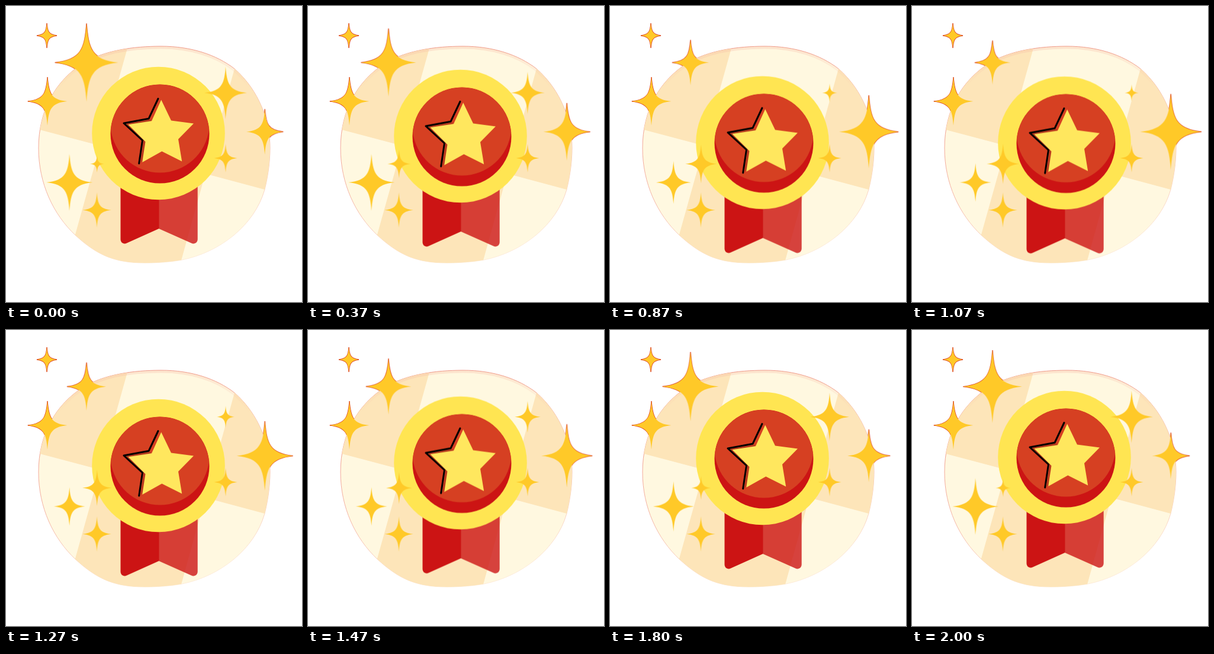
Animation, 500 px wide and 500 px high, one loop 2.03 s. Source, as an HTML page without scripts:

```html
<!DOCTYPE html>
<html lang="en">
<head>
<meta charset="utf-8">
<title>Star medal</title>
<style>
  html, body { margin: 0; width: 100%; height: 100%; overflow: hidden; background: #fff; }
  svg { display: block; width: 100vw; height: 100vh; }

  .medal, .twinkle { animation: 2030ms infinite; }
  .medal { animation-name: bob; }
  .medal, .top, .right { animation-timing-function: cubic-bezier(.364, 0, .636, 1); }
  .top { animation-name: top; }
  .right { animation-name: right; }
  .edge { animation-name: edge; animation-timing-function: linear; }
  .left { animation-name: left; animation-timing-function: cubic-bezier(.364, 0, .636, 1); }
  .ring { animation-name: ring; animation-timing-function: linear; }

  @keyframes bob { 50% { transform: translateY(16.5px); } }
  @keyframes top {
    0% { transform: scale(.66); }
    50% { transform: scale(.37); }
    100% { transform: scale(.615); }
  }
  @keyframes right {
    0%, 100% { transform: scale(.443); }
    50% { transform: scale(.14); }
  }
  @keyframes edge {
    0%, 100% { transform: scale(.385); }
    19% { transform: scale(.492); }
    50% { transform: scale(.655); }
    80% { transform: scale(.492); }
  }
  @keyframes left {
    0%, 28.1%, 100% { transform: scale(.48); }
    50%, 72.4% { transform: scale(.325); }
  }
  @keyframes ring {
    0%, 100% { transform: scale(.145); }
    19% { transform: scale(.245); }
    28% { transform: scale(.28); }
    50% { transform: scale(.35); }
    80% { transform: scale(.245); }
  }
</style>
</head>
<body>
<svg viewBox="0 0 500 500">
  <defs>
    <path id="spark" vector-effect="non-scaling-stroke"
      d="M0-100C5-36 13-7 81 0C13 7 5 36 0 100C-5 36-13 7-81 0C-13-7-5-36 0-100Z"/>
    <path id="blob" d="M262 68C312 68 355 82 386 106C428 143 446 195 446 240C446 265 442 290 437 310C420 370 362 416 297 429C275 433 250 434 235 434C185 434 155 422 117 387C80 352 55 300 55 240C55 175 85 125 130 97C165 75 215 68 262 68Z"/>
    <clipPath id="inside"><use href="#blob"/></clipPath>
    <linearGradient id="rim" gradientUnits="userSpaceOnUse" x1="200" y1="68" x2="300" y2="420">
      <stop offset="0" stop-color="#ee9484"/>
      <stop offset=".6" stop-color="#f4b8a8"/>
      <stop offset="1" stop-color="#fdebd8"/>
    </linearGradient>
    <linearGradient id="haze" gradientUnits="userSpaceOnUse" x1="0" y1="68" x2="0" y2="140">
      <stop offset="0" stop-color="#f6b4a0" stop-opacity=".3"/>
      <stop offset="1" stop-color="#f6b4a0" stop-opacity="0"/>
    </linearGradient>
  </defs>

  <!-- thin red rims, visible only outside the blob -->
  <g fill="#ffc928" stroke="#dc4428" stroke-width="1.3">
    <g transform="translate(136 95.5)"><use href="#spark" class="twinkle top"/></g>
    <g transform="translate(437.2 212.5)"><use href="#spark" class="twinkle edge"/></g>
    <use href="#spark" transform="translate(70 161) scale(.41)"/>
    <use href="#spark" transform="translate(69 50) scale(.21)"/>
  </g>

  <use href="#blob" fill="#fff8e0" stroke="url(#rim)"/>
  <g clip-path="url(#inside)" fill="#fde5b9">
    <path d="M0 0H225L159 236L0 194Z"/>
    <path d="M415.5 0H500V327L336.7 283.3Z"/>
    <path d="M159 236L336.7 283.3L276.5 500H85Z"/>
    <use href="#blob" fill="none" stroke="url(#haze)" stroke-width="9"/>
  </g>

  <g class="medal">
    <path d="M258 280V376L313 400.5C318 403 323.7 400 323.7 394V280Z" fill="#cc1414" opacity=".8"/>
    <path d="M193.5 280V394C193.5 400 199 403 204 400.5L258.5 376V280Z" fill="#cc1414"/>
    <circle cx="257.5" cy="215" r="112.3" fill="#ffe552"/>
    <circle cx="260" cy="216" r="83.5" fill="#cc1414"/>
    <path d="M177 207.2A83.5 83.5 0 0 1 343 207.2A83.5 83.5 0 0 1 177 207.2Z" fill="#d64022"/>
    <path d="M245 193L204 200L234 228L229 263" fill="none" stroke="#b03a1e" stroke-width="2"/>
    <path d="M262.2 158.5L279 193.5L317 198.5L291 225L297.2 262.5L263.3 245.5L230.2 264L235.5 229.3L206.5 200.3L246 194.3Z" fill="#ffe75e"/>
    <path d="M257 156.5L241 190.3L199 198L230.5 227L224.7 266" fill="none" stroke="#000" stroke-width="3" stroke-linecap="round" stroke-linejoin="round"/>
  </g>

  <g fill="#ffc928">
    <g transform="translate(136 95.5)"><use href="#spark" class="twinkle top"/></g>
    <g transform="translate(371 146.7)"><use href="#spark" class="twinkle right"/></g>
    <g transform="translate(437.2 212.5)"><use href="#spark" class="twinkle edge"/></g>
    <g transform="translate(107.2 298)"><use href="#spark" class="twinkle left"/></g>
    <g transform="translate(153.8 266.7)"><use href="#spark" class="twinkle ring"/></g>
    <use href="#spark" transform="translate(70 161) scale(.41)"/>
    <use href="#spark" transform="translate(69 50) scale(.21)"/>
    <use href="#spark" transform="translate(153.5 344.7) scale(.297)"/>
    <use href="#spark" transform="translate(371 257) scale(.24)"/>
  </g>
</svg>
</body>
</html>
```
